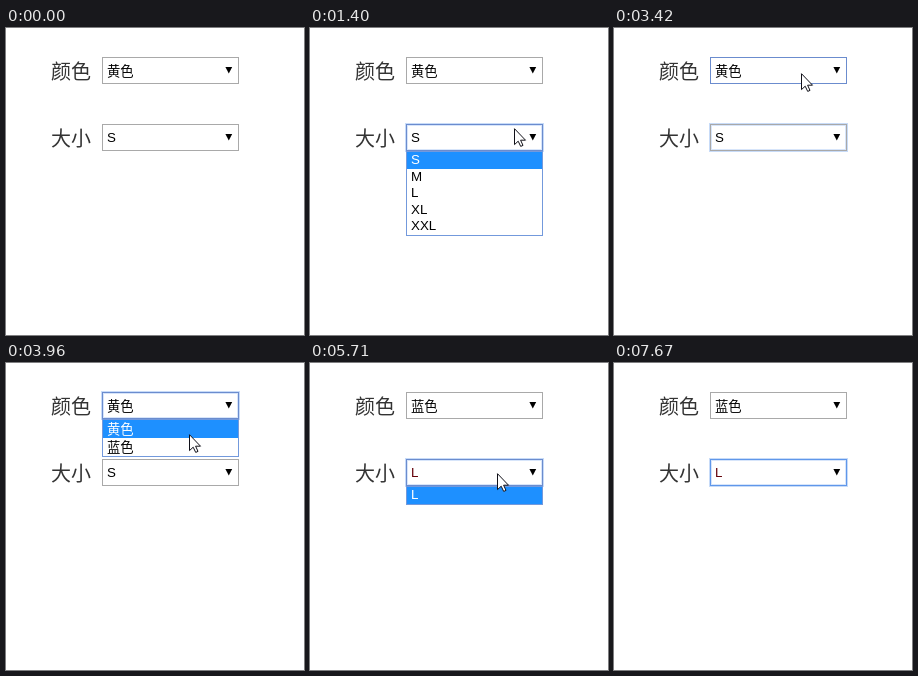
Animation of 298x307 px, one loop 8.1 s. Source, as an HTML page:

```html
<!DOCTYPE html>
<html lang="zh-CN">
<head>
<meta charset="utf-8">
<title>颜色与大小</title>
<style>
  html, body { margin: 0; width: 100%; height: 100%; overflow: hidden; background: #fff; }
  svg { display: block; width: 298px; height: 307px; }
  text { font: 13.333px "Liberation Sans", "Noto Sans CJK SC", "Noto Sans CJK", sans-serif; white-space: pre; }
  .label { font: 20px "Noto Sans CJK SC", "Noto Sans CJK", sans-serif; fill: #333; }
  rect { shape-rendering: crispEdges; }
</style>
</head>
<body>
<svg id="stage" viewBox="0 0 298 307" xmlns="http://www.w3.org/2000/svg"></svg>
<script>
const LOOP = 8100;
const stage = document.getElementById('stage');

function add(tag, attrs, text, parent = stage) {
  const el = document.createElementNS('http://www.w3.org/2000/svg', tag);
  set(el, attrs);
  if (text) el.textContent = text;
  parent.append(el);
  return el;
}

function set(el, attrs) {
  for (const k in attrs) el.setAttribute(k, attrs[k]);
}

function show(el, on) {
  el.setAttribute('visibility', on ? 'visible' : 'hidden');
}

// Border looks: inner line colour, and whether the soft glow is drawn
const RINGS = {
  plain: ['#a9a9a9', false],
  press: ['#6b8cce', false],
  open: ['#6b8cce', true],
  focus: ['#5f97ea', true],
  fading: ['#a9a9a9', true]
};

function makeSelect(label, top) {
  const mid = top + 14;
  add('text', { x: 45, y: mid + 7.5, class: 'label' }, label);
  const glow = add('g', { fill: 'none', stroke: '#5f97ea' });
  add('rect', { x: 95.5, y: top - 0.5, width: 138, height: 28, 'stroke-opacity': 0.35 }, '', glow);
  add('rect', { x: 97.5, y: top + 1.5, width: 134, height: 24, 'stroke-opacity': 0.25 }, '', glow);
  const frame = add('rect', { x: 96.5, y: top + 0.5, width: 136, height: 26, fill: 'none' });
  const value = add('text', { x: 101 });
  add('path', { d: `M219.4 ${mid - 4}h6.8l-3.4 6.6z`, fill: '#000' });
  return (ring, text) => {
    const [stroke, lit] = RINGS[ring];
    set(frame, { stroke });
    show(glow, lit);
    value.textContent = text;
    const latin = text < '~';
    set(value, { y: latin ? top + 18 : top + 19, fill: text === 'L' ? '#640008' : '#000' });
  };
}

function makePopup(top, height, items, rowTop, rowHeight, baselines) {
  const g = add('g', {});
  add('rect', { x: 96.5, y: top + 0.5, width: 136, height: height - 1, fill: '#fff', stroke: '#7399dc' }, '', g);
  const bar = add('rect', { x: 97, width: 135, height: rowHeight, fill: '#1e90ff' }, '', g);
  const rows = items.map((s, i) => add('text', { x: 101, y: baselines[i] }, s, g));
  return (on, active = 0) => {
    show(g, on);
    set(bar, { y: rowTop + active * rowHeight });
    rows.forEach((r, i) => set(r, { fill: i === active ? '#fff' : '#000' }));
  };
}

const drawColor = makeSelect('颜色', 29);
const drawSize = makeSelect('大小', 96);
const popups = {
  color: makePopup(56, 38, ['黄色', '蓝色'], 57, 18, [71, 89]),
  sizes: makePopup(123, 85, ['S', 'M', 'L', 'XL', 'XXL'], 124, 17, [136, 153, 169, 186, 202]),
  single: makePopup(123, 19, ['L'], 124, 17, [136])
};
const pointer = add('path', {
  d: 'M.5 .7V16.6L4.2 13.2L6.7 18.4L9 17.4L6.6 12.2H11.5Z',
  fill: '#fff', stroke: '#101018', 'stroke-width': 1
});

const start = { at: null, color: 'plain', size: 'plain', hue: '黄色', fit: 'S', popup: '', row: 0 };

// Each step lists only what changes from the one before
const steps = [
  [540, { at: [168, 232] }],
  [690, { at: [197, 131] }],
  [840, { at: [204, 100], size: 'press' }],
  [1400, { size: 'open', popup: 'sizes' }],
  [2780, { size: 'focus', popup: '' }],
  [2930, { at: [202, 91] }],
  [3050, { at: [196, 70] }],
  [3180, { at: [190, 52] }],
  [3300, { at: [187, 45] }],
  [3420, { color: 'press', size: 'fading' }],
  [3560, { color: 'open', size: 'plain', popup: 'color' }],
  [3960, { at: [183, 71] }],
  [4080, { at: [179, 78], row: 1 }],
  [4650, { color: 'focus', popup: '', row: 0, hue: '蓝色', fit: 'L' }],
  [5170, { at: [187, 110] }],
  [5290, { size: 'press' }],
  [5710, { color: 'plain', size: 'open', popup: 'single' }],
  [6680, { popup: '' }],
  [7270, { at: [237, 207], size: 'focus' }],
  [7420, { at: [244, 251] }],
  [7540, { at: [261, 290] }],
  [7670, { at: null }]
];

function render(t) {
  const s = { ...start };
  for (const [when, change] of steps) if (t >= when) Object.assign(s, change);
  drawColor(s.color, s.hue);
  drawSize(s.size, s.fit);
  for (const name in popups) popups[name](s.popup === name, s.row);
  show(pointer, s.at);
  if (s.at) set(pointer, { transform: `translate(${s.at})` });
}

let origin = null;
function tick(now) {
  if (origin === null) origin = now;
  render((now - origin) % LOOP);
  requestAnimationFrame(tick);
}
render(0);
requestAnimationFrame(tick);
</script>
</body>
</html>
```
